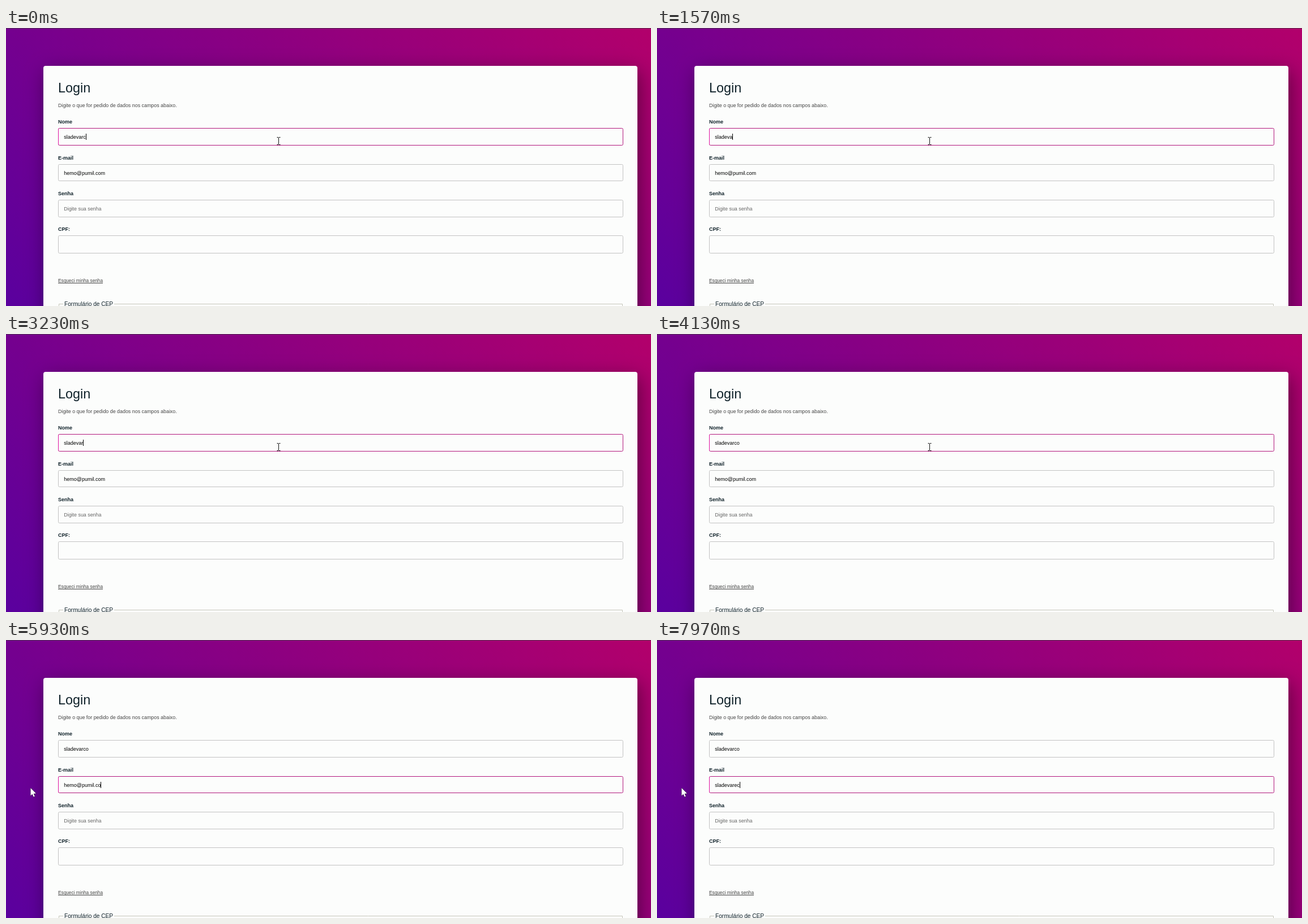
An HTML page with a canvas for the animation above (8000 ms loop, 1139 by 492 pixels).

```html
<!DOCTYPE html>
<html lang="pt-BR">
<head>
<meta charset="utf-8">
<title>Login</title>
<style>
  html, body { margin: 0; width: 100%; height: 100%; overflow: hidden; background: #74008e; }
  canvas { display: block; }
</style>
</head>
<body>
<canvas id="stage" width="1139" height="492"></canvas>
<script>
const W = 1139, H = 492, LOOP = 8000;
const ctx = document.getElementById('stage').getContext('2d');
const FONT = '"Liberation Sans", Arial, sans-serif';
const IDLE = [194, 194, 194], FOCUS = [178, 22, 124];
const CLICK = 4950;

const fields = [
  { label: 'Nome', y: 177.5, h: 30 },
  { label: 'E-mail', y: 241.5, h: 29 },
  { label: 'Senha', y: 304.5, h: 30 },
  { label: 'CPF:', y: 367.5, h: 31 }
];

// Each edit: the old text is erased by a held key, then the new one is typed.
const nameEdit = {
  before: 'sladevarc', after: 'sladevarco',
  erase: 1050, keys: [2080, 2250, 2420, 2580, 2740, 2900, 3060, 3220, 3380, 3550]
};
const mailEdit = {
  before: 'hemo@pumil.com', after: 'sladevarec',
  erase: 5450, keys: [6520, 6680, 6830, 6980, 7130, 7290, 7450, 7610, 7770, 7900]
};

const clamp = v => Math.max(0, Math.min(1, v));
const ease = v => { v = clamp(v); return v * v * (3 - 2 * v); };
const mix = (a, b, k) => `rgb(${a.map((v, i) => Math.round(v + (b[i] - v) * k))})`;

function text(str, x, y, size, color, weight = 'normal') {
  ctx.font = `${weight} ${size}px ${FONT}`;
  ctx.fillStyle = color;
  ctx.fillText(str, x, y);
  return ctx.measureText(str).width;
}

function box(x, y, w, h, r) {
  ctx.beginPath();
  ctx.roundRect(x, y, w, h, r);
}

function poly(points) {
  ctx.beginPath();
  points.forEach(([x, y]) => ctx.lineTo(x, y));
  ctx.closePath();
}

function editState(edit, t) {
  const { before, after, erase, keys } = edit;
  const typed = keys.filter(k => k <= t).length;
  if (typed) return { value: after.slice(0, typed), last: keys[typed - 1] };
  if (t < erase) return { value: before, last: null };
  const held = t - erase - 500;
  const gone = held < 0 ? 1 : Math.min(before.length, 2 + Math.floor(held / 33));
  const last = gone === 1 ? erase : erase + 500 + (gone - 2) * 33;
  return { value: before.slice(0, before.length - gone), last };
}

function backdrop() {
  const g = ctx.createLinearGradient(-245, 245, 569.5, -569.5);
  g.addColorStop(0, 'rgb(90,0,158)');
  g.addColorStop(1, 'rgb(178,0,107)');
  ctx.fillStyle = g;
  ctx.fillRect(0, 0, W, H);
  ctx.fillStyle = 'rgba(60,60,60,.75)';
  ctx.fillRect(0, 0, W, 1);

  ctx.save();
  ctx.shadowColor = 'rgba(0,0,0,.42)';
  ctx.shadowBlur = 34;
  ctx.shadowOffsetX = 4;
  ctx.shadowOffsetY = 10;
  ctx.fillStyle = '#fcfdfc';
  box(66, 67, 1049, 700, 4);
  ctx.fill();
  ctx.restore();
}

function staticText() {
  text('Login', 92, 113.5, 23.4, '#10222a');
  text('Digite o que for pedido de dados nos campos abaixo.', 92, 140, 8.9, '#444');
  const w = text('Esqueci minha senha', 92, 450, 8.27, '#444');
  ctx.fillRect(92, 451, w, 1);

  ctx.strokeStyle = '#c4c4b8';
  ctx.lineWidth = 1;
  ctx.beginPath();
  ctx.moveTo(101, 488.5);
  ctx.lineTo(93.5, 488.5);
  ctx.lineTo(93.5, H);
  ctx.moveTo(191, 488.5);
  ctx.lineTo(1088.5, 488.5);
  ctx.lineTo(1088.5, H);
  ctx.stroke();
  text('Formulário de CEP', 103, 492, 10.15, '#10222a');
}

function drawField(f, focus) {
  text(f.label, 92, f.y - 8.5, 9, '#10222a', 'bold');
  ctx.strokeStyle = mix(IDLE, FOCUS, focus);
  ctx.lineWidth = 1;
  box(92.5, f.y, 997, f.h, 2);
  ctx.stroke();
  if (focus > 0) {
    ctx.fillStyle = `rgba(235,20,170,${focus * .8})`;
    ctx.fillRect(92, f.y + 1, 1, f.h - 2);
  }
}

function drawValue(f, value, caret) {
  const w = text(value, 102.3, Math.floor(f.y) + 19, 9, '#000');
  if (caret) ctx.fillRect(Math.round(102.3 + w), Math.floor(f.y) + 10, 1, 11);
}

function mouse(t) {
  const a = ease((t - 4250) / 600), b = ease((t - 5250) / 650);
  return [
    481.5 + (269.5 - 481.5) * a + (43.5 - 269.5) * b,
    200 + (259.5 - 200) * a + (262 - 259.5) * b
  ];
}

function beam(x, y) {
  x = Math.round(x - .5) + .5;
  y = Math.round(y);
  ctx.strokeStyle = '#111';
  ctx.lineWidth = 1;
  ctx.beginPath();
  for (const s of [-1, 1]) {
    ctx.moveTo(x - 3, y + s * 6.5);
    ctx.lineTo(x - .5, y + s * 6.5);
    ctx.moveTo(x + .5, y + s * 6.5);
    ctx.lineTo(x + 3, y + s * 6.5);
  }
  ctx.moveTo(x, y - 6);
  ctx.lineTo(x, y + 6);
  ctx.stroke();
}

function arrow(x, y) {
  ctx.save();
  ctx.translate(x, y);
  poly([[0, 0], [0, 13.5], [3, 10.8], [5.2, 15.6], [7.3, 14.7], [5.2, 10], [9.4, 9.6]]);
  ctx.fillStyle = '#fff';
  ctx.strokeStyle = '#111';
  ctx.lineWidth = .8;
  ctx.stroke();
  ctx.fill();
  ctx.restore();
}

function draw(t) {
  backdrop();
  staticText();

  const shift = ease((t - CLICK) / 260);
  fields.forEach((f, i) => drawField(f, [1 - shift, shift, 0, 0][i]));

  const name = editState(nameEdit, t), mail = editState(mailEdit, t);
  const onMail = t >= CLICK;
  const last = onMail ? mail.last ?? CLICK : name.last ?? -230;
  const lit = (t - last) % 1060 < 530;
  drawValue(fields[0], name.value, lit && !onMail);
  drawValue(fields[1], mail.value, lit && onMail);
  text('Digite sua senha', 102.3, 323, 8.9, '#666');

  const [x, y] = mouse(t);
  const inside = fields.some(f => x > 92 && x < 1090 && y > f.y && y < f.y + f.h);
  (inside ? beam : arrow)(x, y);
}

const start = performance.now();
function tick() {
  draw((performance.now() - start) % LOOP);
  requestAnimationFrame(tick);
}
tick();
</script>
</body>
</html>
```
